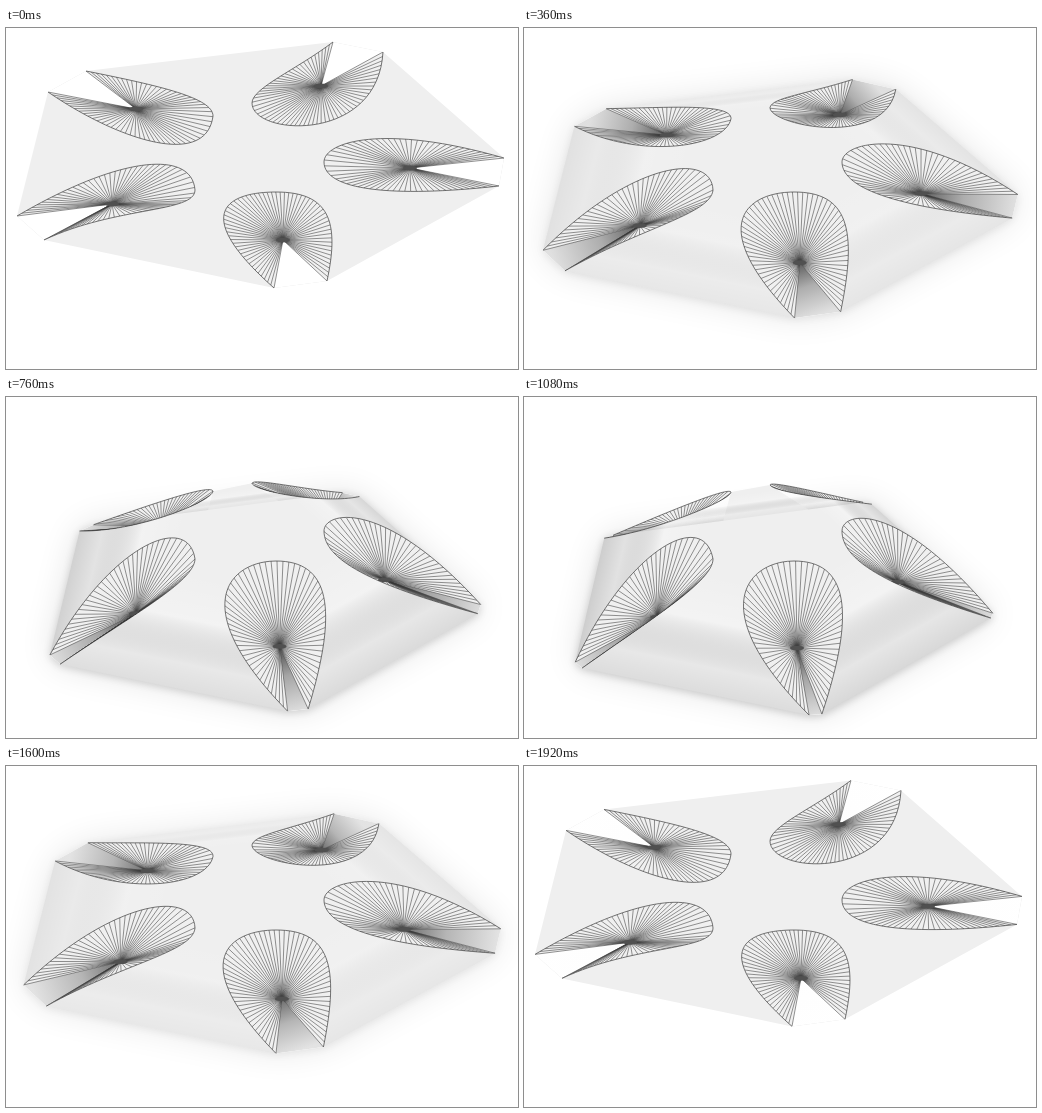
An HTML page for the animation above (1960 ms loop, 512 by 341 pixels).

```html
<!DOCTYPE html>
<html lang="en">
<head>
<meta charset="utf-8">
<title>Folding sheet</title>
<style>
  html, body { margin: 0; width: 100%; height: 100%; overflow: hidden; background: #fff; }
  svg { display: block; width: 100%; height: 100%; }
</style>
</head>
<body>
<svg id="stage" viewBox="0 0 512 341">
  <defs id="defs">
    <filter id="wide" x="-30%" y="-30%" width="160%" height="160%"><feGaussianBlur stdDeviation="17"/></filter>
    <filter id="tight" x="-20%" y="-20%" width="140%" height="140%"><feGaussianBlur stdDeviation="4"/></filter>
  </defs>
</svg>
<script>
const LOOP = 1960, STEP = 40, PEAK = 962, RAYS = 64;
const POSES = [0, 0.542, 0.875];
const SHEET = '#efefef', INK = '#3a3a3a';
const stage = document.getElementById('stage');
const defs = document.getElementById('defs');

function add(parent, tag, attrs = {}) {
  const el = document.createElementNS('http://www.w3.org/2000/svg', tag);
  return set(parent.appendChild(el), attrs);
}
function set(el, attrs) {
  for (const key in attrs) el.setAttribute(key, attrs[key]);
  return el;
}
function gradient(id, stops) {
  const el = add(defs, 'linearGradient', { id, gradientUnits: 'userSpaceOnUse' });
  const parts = stops.map(([offset, color]) => add(el, 'stop', { offset, 'stop-color': color }));
  return { el, parts };
}
function aim(grad, [x1, y1], [x2, y2]) {
  set(grad.el, { x1, y1, x2, y2 });
}
const pt = p => p[0].toFixed(2) + ' ' + p[1].toFixed(2);
const poly = points => 'M' + points.map(pt).join('L') + 'Z';
const middle = (p, q) => [(p[0] + q[0]) / 2, (p[1] + q[1]) / 2];

const wideShadow = add(stage, 'path', { filter: 'url(#wide)' });
const tightShadow = add(stage, 'path', { filter: 'url(#tight)' });
const body = add(stage, 'path', { fill: SHEET });
const panelLayer = add(stage, 'g');
const fanLayer = add(stage, 'g');

// Pose: tip, handle, handle, round end, handle, handle, tip, apex
const fans = [];
function fan(...poses) {
  const id = fans.length;
  const clip = add(add(defs, 'clipPath', { id: 'clip' + id }), 'path');
  const cutShade = gradient('cut' + id, [[0, '#4a4a4a'], [0.45, '#a4a4a4'], [1, '#dcdcdc']]);
  const fill = add(fanLayer, 'path', { fill: '#f0f0f0' });
  const inside = add(fanLayer, 'g', { 'clip-path': `url(#clip${id})` });
  fans.push({
    poses, clip, cutShade, fill,
    gap: add(inside, 'path', { fill: '#fff' }),
    cut: add(inside, 'path', { fill: `url(#cut${id})` }),
    rays: add(inside, 'path', { stroke: INK, 'stroke-width': 0.55 }),
    knot: add(inside, 'ellipse', { rx: 7, ry: 2.4, fill: '#505050' }),
    rim: add(fanLayer, 'path', { fill: 'none', stroke: INK, 'stroke-width': 0.7 })
  });
}

fan([268,260, 180,182, 225,164, 270,164, 323,164, 334,193, 321,253, 277,212],
    [274,301, 177,200, 225,164, 270,164, 323,164, 334,203, 312,296, 275,242],
    [285,318, 177,210, 225,164, 270,164, 323,164, 333,212, 298,317, 273,251]);
fan([493,158, 385,170, 318,162, 318,134, 318,114, 377,95, 498,130, 404,140],
    [483,202, 375,184, 318,162, 318,134, 318,114, 386,97, 488,183, 391,174],
    [467,221, 358,188, 318,162, 318,134, 318,114, 374,103, 469,216, 374,185]);
fan([377,24, 372,116, 246,108, 246,75, 246,60, 290,42, 327,14, 315,58],
    [366,77, 348,118, 246,95, 246,82, 248,74, 285,77, 331,69, 318,99],
    [348,107, 305,102, 250,95, 246,88, 246,83, 305,98, 339,105, 325,122]);
fan([80,43, 155,58, 207,70, 207,88, 200,141, 112,112, 42,64, 130,81],
    [84,99, 145,90, 207,79, 207,92, 203,112, 122,136, 58,113, 148,117],
    [89,138, 150,112, 204,90, 207,95, 207,103, 135,133, 80,141, 158,133]);
fan([11,188, 115,127, 186,122, 189,162, 189,185, 110,178, 38,212, 106,176],
    [27,237, 103,140, 186,120, 189,162, 187,186, 120,208, 45,254, 121,206],
    [51,265, 105,150, 180,112, 189,162, 189,184, 130,220, 58,271, 133,220]);

const panels = [0.11, 0.13, 0.05, 0.16, 0.09].map((depth, i) => {
  const shade = gradient('panel' + i, [[0, '#000'], [0.22, '#000'], [0.6, '#fff'], [1, '#fff']]);
  return { depth, shade, path: add(panelLayer, 'path', { fill: `url(#panel${i})` }) };
});

// Quadratic blend through the three poses
function blend(poses, q) {
  const weights = POSES.map((a, i) =>
    POSES.reduce((w, b, j) => i === j ? w : w * (q - b) / (a - b), 1));
  const points = [];
  for (let k = 0; k < poses[0].length; k += 2) {
    points.push([k, k + 1].map(n => poses.reduce((sum, pose, i) => sum + pose[n] * weights[i], 0)));
  }
  return points;
}

function drawFan(f, q) {
  const [a, a1, a2, end, b2, b1, b, apex] = blend(f.poses, q);
  const curve = `M${pt(a)}C${pt(a1)},${pt(a2)},${pt(end)}C${pt(b2)},${pt(b1)},${pt(b)}`;
  for (const el of [f.rim, f.fill, f.clip]) set(el, { d: curve });

  const length = f.rim.getTotalLength();
  let rays = '';
  for (let i = 0; i <= RAYS; i++) {
    const p = f.rim.getPointAtLength(length * i / RAYS);
    rays += `M${pt(apex)}L${pt([p.x, p.y])}`;
  }
  set(f.rays, { d: rays });
  set(f.knot, { cx: apex[0], cy: apex[1] });

  const wedge = poly([a, apex, b]);
  set(f.gap, { d: wedge });
  set(f.cut, { d: wedge, opacity: Math.min(1, q * 2.4) });
  aim(f.cutShade, apex, middle(a, b));
  return { a, b, end, curve: curve + 'Z' };
}

function drawPanel(panel, from, to, q) {
  const { b } = from, { a } = to;
  set(panel.path, { d: poly([b, a, to.end, from.end]) });
  const rim = middle(b, a), inner = middle(from.end, to.end);
  const dx = a[0] - b[0], dy = a[1] - b[1], size = Math.hypot(dx, dy);
  const normal = [-dy / size, dx / size];
  const reach = 0.85 * ((inner[0] - rim[0]) * normal[0] + (inner[1] - rim[1]) * normal[1]);
  aim(panel.shade, rim, [rim[0] + normal[0] * reach, rim[1] + normal[1] * reach]);
  [panel.depth, panel.depth * 0.4, 0.3, 0].forEach((alpha, i) =>
    set(panel.shade.parts[i], { 'stop-opacity': alpha * q }));
}

function draw(time) {
  const t = Math.floor(time % LOOP / STEP) * STEP;
  const q = Math.max(0, 1 - Math.abs(t - PEAK) / PEAK);
  const shapes = fans.map(f => drawFan(f, q));
  const outline = poly(shapes.flatMap(s => [s.a, s.b]));
  const plate = poly(shapes.map(s => s.end));

  set(body, { d: outline + plate });
  panels.forEach((panel, i) => drawPanel(panel, shapes[i], shapes[(i + 1) % shapes.length], q));
  set(wideShadow, { d: outline, opacity: 0.11 * Math.min(1, q * 2.5) });
  set(tightShadow, { d: outline, opacity: 0.2 * q, transform: 'translate(0 1.5)' });
}

function tick(now) {
  draw(now);
  requestAnimationFrame(tick);
}
draw(0);
requestAnimationFrame(tick);
</script>
</body>
</html>
```
